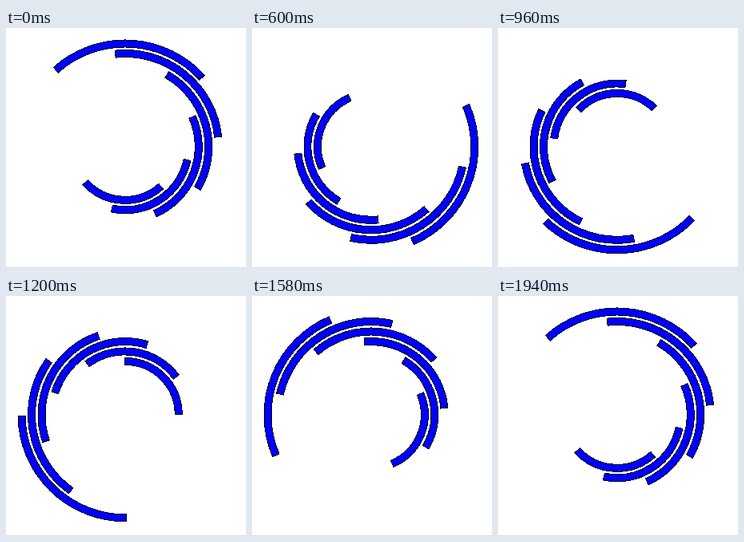
Recreate the animation shown at these times as an HTML page. Size 300 px wide and 301 px high, loop 1.98 s.

```html
<!DOCTYPE html>
<html lang="en">
<head>
<meta charset="utf-8">
<title>Rotating arcs</title>
<style>
  html, body { margin: 0; width: 100%; height: 100%; overflow: hidden; background: #fff; }
  svg { display: block; }
</style>
</head>
<body>
<svg width="300" height="301" shape-rendering="crispEdges">
  <rect y="300" width="300" height="1" fill="#ddd"/>
  <g id="arcs" fill="#00f" stroke="#000" stroke-width="1"></g>
</svg>
<script>
const LOOP = 1980, TICK = 20, PAUSE = 560;
const CENTER = 148.9;
const ARCS = 6, OUTER = 129.4, GAP = 12.5, HALF = 4.5;

// Middle of the outermost arc: [time in ms, degrees]
const KEYS = [[20, -87], [340, -30.7], [600, 21.5], [960, 88.7], [1200, 134.4], [1580, 201.8], [1940, 273]];

const group = document.getElementById('arcs');
const bands = Array.from({ length: ARCS }, () =>
  group.appendChild(document.createElementNS('http://www.w3.org/2000/svg', 'path')));

function angleAt(t) {
  const last = KEYS.length - 1;
  const time = Math.min(Math.max(t, KEYS[0][0]), KEYS[last][0]);
  const i = KEYS.findIndex((k, n) => n > 0 && k[0] >= time);
  const [t0, a0] = KEYS[i - 1], [t1, a1] = KEYS[i];
  return a0 + (a1 - a0) * (time - t0) / (t1 - t0);
}

function point(r, deg) {
  const a = deg * Math.PI / 180;
  return `${CENTER + r * Math.cos(a)} ${CENTER + r * Math.sin(a)}`;
}

// Quarter ring around the direction mid
function bandPath(r, mid) {
  const out = r + HALF, inn = r - HALF, from = mid - 45, to = mid + 45;
  return `M${point(out, from)} A${out} ${out} 0 0 1 ${point(out, to)}` +
    `L${point(inn, to)} A${inn} ${inn} 0 0 0 ${point(inn, from)}Z`;
}

function draw(now) {
  let t = Math.floor((now % LOOP) / TICK) * TICK;
  if (t % PAUSE === 0) t -= TICK;
  const angle = angleAt(t);
  bands.forEach((band, i) => band.setAttribute('d', bandPath(OUTER - GAP * i, angle + 36 * i)));
}

let start;
function loop(now) {
  start ??= now;
  draw(Math.max(0, now - start));
  requestAnimationFrame(loop);
}
draw(0);
requestAnimationFrame(loop);
</script>
</body>
</html>
```
